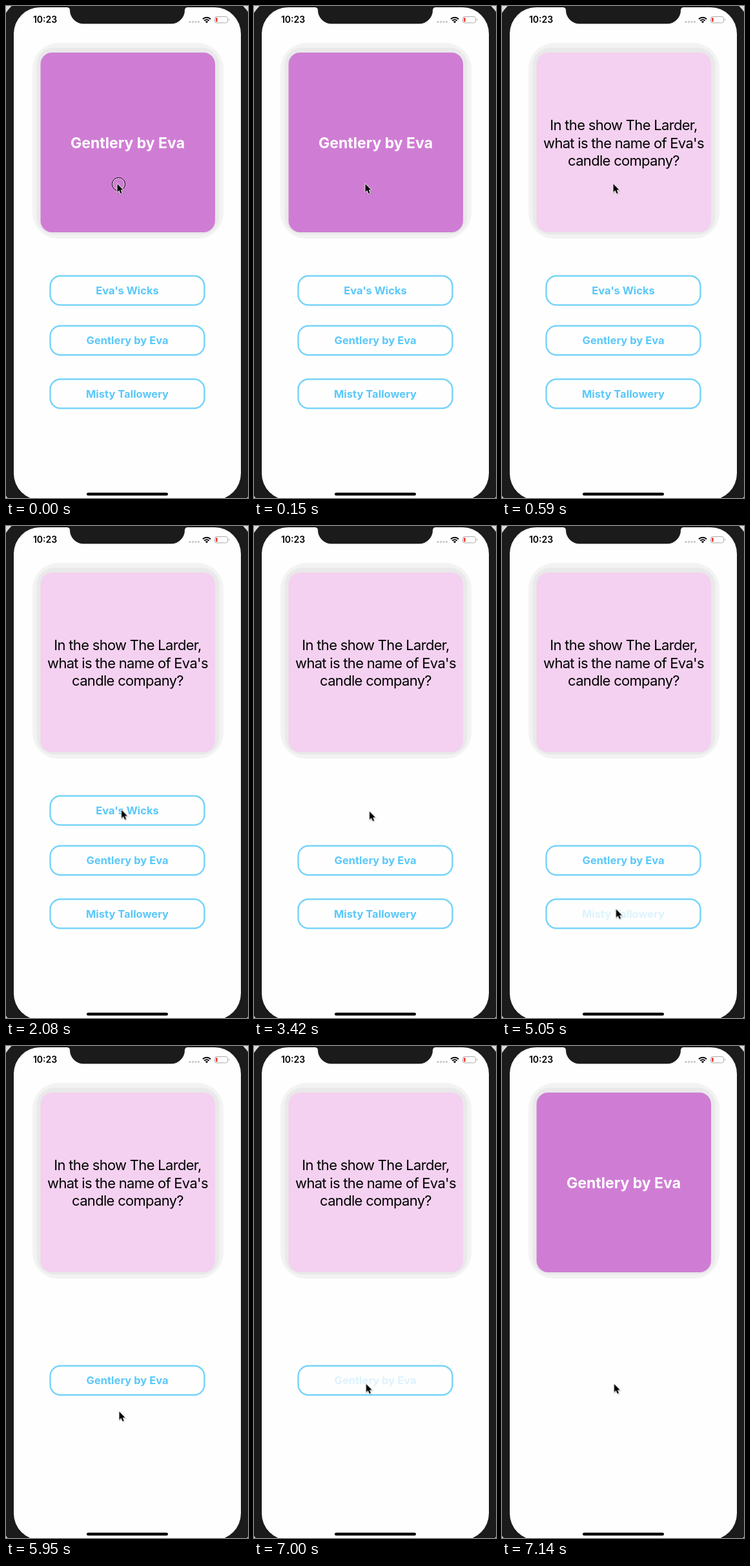
Write an HTML page that moves like this. It is 375x761 px and loops after 8000 ms.

```html
<!DOCTYPE html>
<html lang="en">
<head>
<meta charset="utf-8">
<title>Quiz flashcard</title>
<style>
  html, body { margin: 0; width: 100%; height: 100%; overflow: hidden; background: #dcdcdc; }
  svg { display: block; width: 375px; height: 761px; font-family: Inter, Roboto, sans-serif; }
  text { text-anchor: middle; }
  .title { font-size: 23px; font-weight: 700; fill: #fff; }
  .question { font-size: 22px; letter-spacing: -.7px; fill: #000; }
  .answer rect { fill: none; stroke: #79d4f9; stroke-width: 2.5; }
  .answer text { font-size: 16.5px; font-weight: 700; fill: #5ac8fa; }
  .clock { font-size: 14px; font-weight: 600; }
</style>
</head>
<body>
<svg viewBox="0 0 375 761">
  <!-- phone -->
  <rect x="-6" y="-11" width="388" height="790" rx="44" fill="#1b1b1b"/>
  <rect x="12" y="2" width="352" height="762" rx="41" fill="#fefefe"/>
  <path d="M94 1.500V2Q99 2 99 6.500A21 21 0 0 0 120 27.500H256A21 21 0 0 0 277 6.500Q277 2 282 2V1.500Z" fill="#1b1b1b"/>
  <rect x="125" y="752.800" width="126" height="4.400" rx="2.200"/>

  <!-- status bar -->
  <text class="clock" x="60.500" y="26">10:23</text>
  <g fill="#c4c4c4">
    <circle cx="285" cy="24.500" r="1.600"/><circle cx="289.500" cy="24.500" r="1.600"/>
    <circle cx="294" cy="24.500" r="1.600"/><circle cx="298.500" cy="24.500" r="1.600"/>
  </g>
  <g fill="none" stroke="#000" stroke-width="2">
    <path d="M305 20.200A8.700 8.700 0 0 1 317 20.200"/>
    <path d="M307.300 22.700A5.400 5.400 0 0 1 314.700 22.700"/>
  </g>
  <path d="M311 26.500L308.800 24.200A3.200 3.200 0 0 1 313.200 24.200Z"/>
  <rect x="323.500" y="16.500" width="20" height="9.500" rx="2.800" fill="none" stroke="#a9a9a9"/>
  <path d="M345 19.500Q347 21.200 345 23Z" fill="#a9a9a9"/>
  <rect x="325" y="18" width="2.600" height="6.500" rx="1" fill="#ff3b30"/>

  <!-- card -->
  <rect x="41" y="57" width="296" height="303" rx="40" fill="#f3f3f3"/>
  <rect x="47.500" y="64.500" width="283" height="289" rx="27" fill="#e9e9e9"/>
  <g id="front">
    <rect x="53.500" y="72" width="270.500" height="278" rx="18" fill="#cf7dd4"/>
    <text class="title" x="188.500" y="220">Gentlery by Eva</text>
  </g>
  <g id="back">
    <rect x="53.500" y="72" width="270.500" height="278" rx="18" fill="#f4d1f0"/>
    <g class="question">
      <text x="188.500" y="192">In the show The Larder,</text>
      <text x="188.500" y="219.500">what is the name of Eva's</text>
      <text x="188.500" y="247">candle company?</text>
    </g>
  </g>

  <g id="answers"></g>

  <!-- pointer -->
  <g id="ring" fill="none">
    <circle cx="174.500" cy="275.500" r="9" stroke="#fff" stroke-opacity=".75"/>
    <circle cx="174.500" cy="275.500" r="10" stroke="#000"/>
  </g>
  <g id="pointer">
    <g transform="translate(0 -.8) scale(.9)">
      <path d="M0 0V14L3.200 11L5.600 16.500L8 15.500L5.700 10.300H10Z" transform="translate(.5 1)"
        stroke="#000" stroke-opacity=".12" stroke-width="2.500"/>
      <path d="M0 0V14L3.200 11L5.600 16.500L8 15.500L5.700 10.300H10Z"
        stroke="#fff" stroke-width="2" stroke-linejoin="round" paint-order="stroke"/>
    </g>
  </g>
</svg>

<script>
const LOOP = 8000;
const $ = id => document.getElementById(id);

// Holds each value until the next [time, value] step.
function hold(el, prop, steps) {
  const frames = steps.map(([t, v]) => ({ offset: t / LOOP, [prop]: v, easing: 'step-end' }));
  frames.push({ offset: 1, [prop]: steps[steps.length - 1][1] });
  el.animate(frames, { duration: LOOP, iterations: Infinity });
}

// label, top edge, tap time, removal time
const answers = [
  ["Eva's Wicks", 417.5, 2530, 2670],
  ['Gentlery by Eva', 494.8, 7000, 7140],
  ['Misty Tallowery', 577.3, 5050, 5200]
];

for (const [label, y, tap, gone] of answers) {
  $('answers').insertAdjacentHTML('beforeend',
    `<g class="answer"><rect x="68.5" y="${y}" width="239" height="45" rx="16"/>
     <text x="188" y="${y + 28.5}">${label}</text></g>`);
  const group = $('answers').lastElementChild;
  hold(group.querySelector('text'), 'opacity', [[0, 1], [tap, .2]]);
  hold(group, 'opacity', [[0, 1], [gone, 0]]);
}

hold($('back'), 'opacity', [[0, 0], [590, 1], [7140, 0]]);
hold($('front'), 'opacity', [[0, 1], [590, 0], [7140, 1]]);
hold($('ring'), 'opacity', [[0, 1], [150, 0]]);

// time, x, y of the pointer tip
const path = [
  [0, 172.5, 276], [1490, 177.3, 322.3], [1630, 180, 390.3], [1780, 179.8, 421.3],
  [1930, 179, 436.3], [2080, 179, 440], [3420, 179, 442.3], [3560, 178.8, 499.3],
  [3710, 178.8, 546.3], [3860, 178.5, 575.3], [4010, 177.7, 588.3], [4150, 176.8, 593.6],
  [5950, 175.5, 566.3], [6100, 173.8, 540.3], [6250, 173.8, 527.3], [6400, 173.8, 523.6]
];
hold($('pointer'), 'transform', path.map(([t, x, y]) => [t, `translate(${x}px, ${y}px)`]));
</script>
</body>
</html>
```
